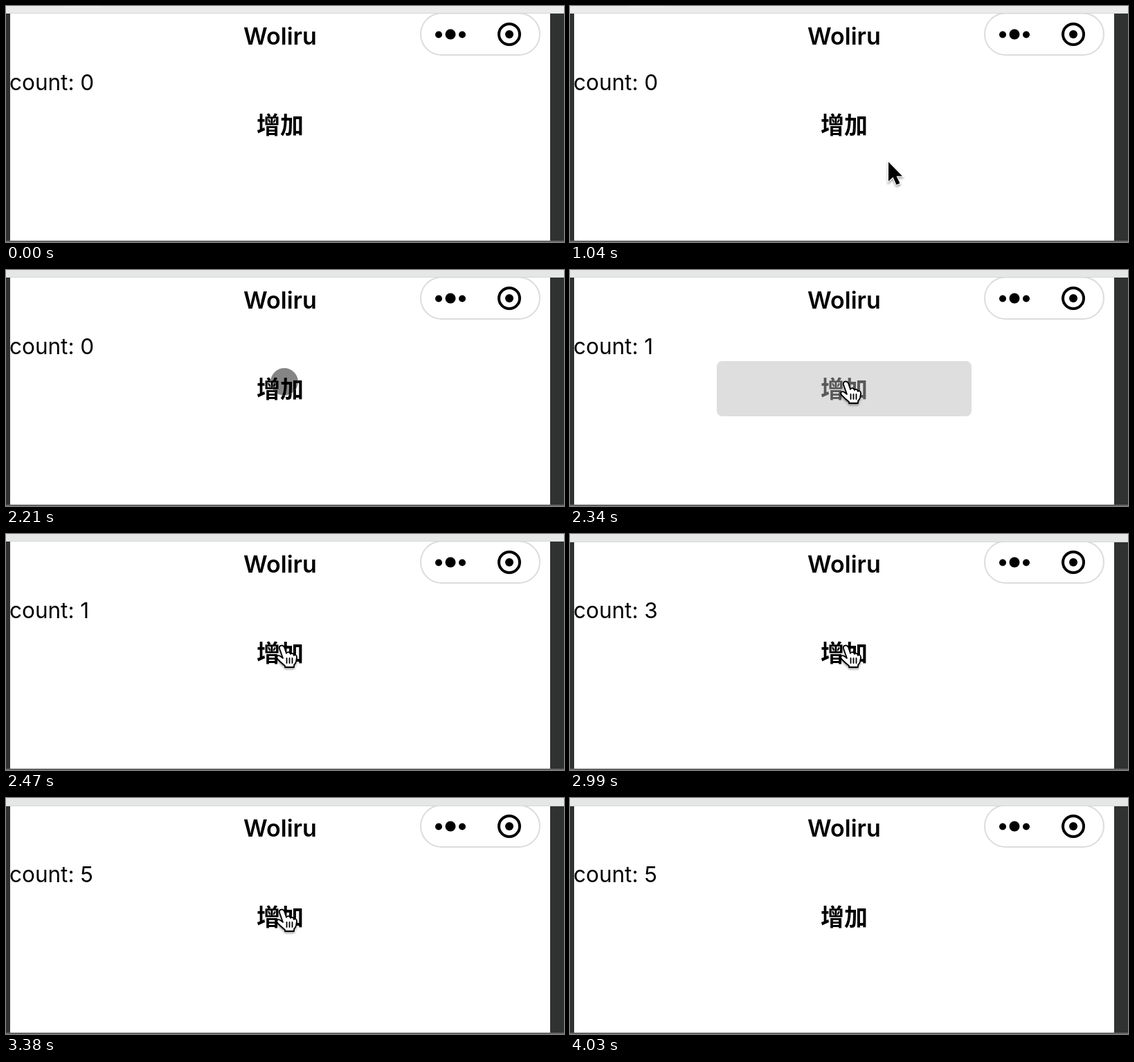
These frames come from a looping animation (806x342 px, 4550 ms). An HTML page:

```html
<!DOCTYPE html>
<html lang="zh">
<head>
<meta charset="utf-8">
<style>
  html, body { margin: 0; width: 100%; height: 100%; overflow: hidden; background: #fff; }
  svg { display: block; width: 806px; height: 342px; }
  text { font-family: Inter, "Noto Sans CJK SC", "Noto Sans CJK", sans-serif; }
  .cursor { filter: drop-shadow(0 2px 1.5px #0006); }
</style>
</head>
<body>
<svg viewBox="0 0 806 342">
  <rect width="806" height="342" fill="#fff"/>
  <text x="396" y="56" font-size="34" font-weight="600" text-anchor="middle">Woliru</text>

  <rect x="599" y="10.5" width="172" height="60.5" rx="30.25" fill="none" stroke="#dcdcdc" stroke-width="2"/>
  <circle cx="625" cy="41.5" r="5"/>
  <circle cx="642" cy="41" r="7.5"/>
  <circle cx="659" cy="41.5" r="5"/>
  <circle cx="727" cy="41" r="15" fill="none" stroke="#000" stroke-width="4"/>
  <circle cx="727" cy="41" r="6"/>

  <text id="count" x="5" y="122" font-size="31.5"></text>
  <rect id="button" x="212" y="132" width="368" height="80" rx="8" fill="#dedede"/>
  <text id="label" x="396" y="185" font-size="34" font-weight="700" text-anchor="middle">增加</text>

  <path d="M0 10H6V342H0ZM786 10H806V342H786Z" fill="#303131"/>
  <path d="M0 341H806" stroke="#626262" stroke-width="2"/>
  <rect id="bar" width="806"/>
  <circle id="glow" cx="111" cy="34" r="42" fill="#f0f0f0" clip-path="inset(0 0 74px 0)"/>
  <rect id="edge" width="806" height="1" fill="#d6d7d7"/>

  <circle id="touch" cx="402" cy="162" r="19.5" fill="#000" fill-opacity=".48" stroke="#666" stroke-opacity=".5"/>
  <path id="arrow" class="cursor" d="M0 0V28L6.5 22L11.5 33L16.5 31L11.5 20.5H20Z"
        stroke="#fff" stroke-width="2.4" paint-order="stroke"/>
  <g id="hand" class="cursor" stroke="#000" stroke-width="1.8" stroke-linejoin="round" stroke-linecap="round">
    <path fill="#fff" d="M-4 4C-5 -1 1 -2 3 2L6 11C8 8 11 9 12 12C14 10 16 11 17 14C19 12 21 14 21 17
      L20 23Q19 26 17 28V31H4V29Q0 26 -6 20C-10 15 -6 13 -3 15L1 18Z"/>
    <path fill="none" d="M6.5 18V25M10.5 18V25M14.5 18V25"/>
  </g>
</svg>
<script>
const STEP = 130, LOOP = 4550;
const el = id => document.getElementById(id);
const show = (id, on) => el(id).setAttribute("visibility", on ? "visible" : "hidden");

// [start time, pointer kind, x, y]
const pointer = [
  [0], [1040, "arrow", 460, 226], [1170, "hand", 424, 189], [1300, "hand", 402, 165],
  [1430, "hand", 399, 162], [1690, "touch"], [2340, "hand", 399, 162],
  [3770, "arrow", 448, 216], [3900, "arrow", 604, 312], [4030]
];
// [start time, count, pressed]
const taps = [
  [0, 0, false], [2340, 1, true], [2470, 1, false], [2600, 2, false], [2860, 3, true],
  [2990, 3, false], [3120, 3, true], [3250, 4, true], [3380, 5, false]
];
const current = (list, t) => list.findLast(([start]) => start <= t);

function draw(now) {
  const t = Math.floor(now % LOOP / STEP) * STEP;
  const [, kind, x, y] = current(pointer, t);
  const [, count, pressed] = current(taps, t);

  for (const id of ["arrow", "hand", "touch"]) show(id, id === kind);
  if (x) el(kind).setAttribute("transform", `translate(${x} ${y})`);

  el("count").textContent = `count: ${count}`;
  show("button", pressed);
  el("label").setAttribute("fill", pressed ? "#595959" : "#000");

  const barHeight = t < 2860 ? 10 : 12;
  el("bar").setAttribute("height", barHeight);
  el("bar").setAttribute("fill", t < 2080 ? "#ebebeb" : "#e5e7e6");
  el("edge").setAttribute("y", barHeight - (t < 2860 ? 0 : 1));
  show("glow", t < 2080);
  requestAnimationFrame(draw);
}
requestAnimationFrame(draw);
</script>
</body>
</html>
```
